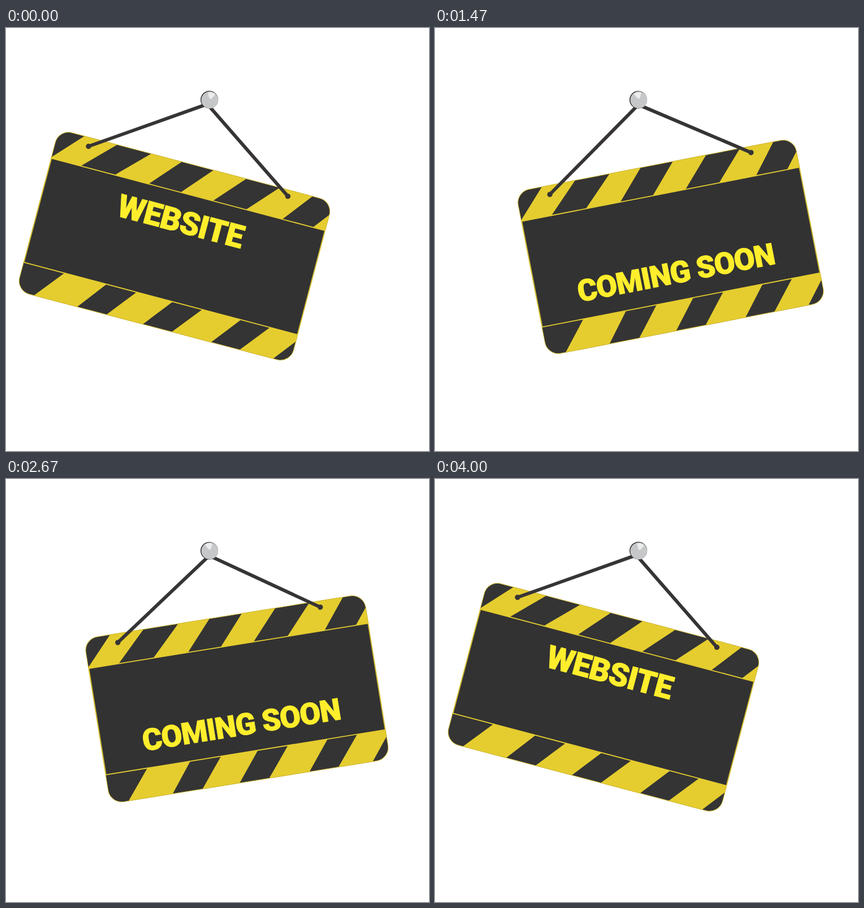
These frames come from a looping animation (748x748 px, 4060 ms). An HTML page:

```html
<!DOCTYPE html>
<html lang="en">
<head>
<meta charset="utf-8">
<title>Swinging sign</title>
<style>
  html, body { margin: 0; height: 100%; overflow: hidden; background: #fff; }
  svg { display: block; width: 100vw; height: 100vh; }
  text {
    font: 900 64px Roboto, "Open Sans", sans-serif;
    font-stretch: 84%;
    letter-spacing: -.02em;
    text-anchor: middle;
    fill: #ffee2c;
    stroke: #ffee2c;
    stroke-width: 1;
  }
</style>
</head>
<body>
<svg viewBox="0 0 748 748">
  <defs>
    <clipPath id="board"><rect x="-244.5" y="118.4" width="501.2" height="295.4" rx="24"/></clipPath>
    <clipPath id="clipA"><rect y="180" height="80"/></clipPath>
    <clipPath id="clipB"><rect y="272" height="80"/></clipPath>
  </defs>
  <g id="sign">
    <g clip-path="url(#board)">
      <rect x="-246" y="117" width="504" height="298" fill="#343434"/>
      <path id="stripes" fill="#e5cd2f"/>
      <rect x="-244" y="171.3" width="500.3" height="190.5" fill="#323232" stroke="#e5cd2f" stroke-width="1.8"/>
    </g>
    <rect x="-244.5" y="118.4" width="501.2" height="295.4" rx="24" fill="none" stroke="#d2ba30"/>
    <g clip-path="url(#clipA)"><text id="textA" x="5.3">WEBSITE</text></g>
    <g clip-path="url(#clipB)"><text id="textB" x="6.3">COMING SOON</text></g>
    <g fill="#373435">
      <path d="M-186 134.2 L-2 8.4 L177.4 129.5" fill="none" stroke="#373435" stroke-width="6"/>
      <circle cx="-186" cy="134.2" r="4.7"/>
      <circle cx="177.4" cy="129.5" r="4.7"/>
    </g>
    <circle cx="-.5" cy="-.2" r="15.6" fill="#373435"/>
    <circle cx=".3" cy=".2" r="14.9" fill="#c6c7c9"/>
    <path d="M-6 -12 Q0 -15.5 7 -12 L4.500 -6 Q2.500 -1 0 -2 Q-3 -4 -6 -12Z" fill="#ebecec"/>
  </g>
</svg>
<script>
const $ = id => document.getElementById(id);
const STEP = 100 / 3, LOOP = 4060;

// Each stripe: top left, top right, bottom right, bottom left
const band = (y1, y2, list) => list.map(([a, b, c, d]) =>
  `M${a} ${y1}L${b} ${y1}L${c} ${y2}L${d} ${y2}Z`).join('');

$('stripes').setAttribute('d',
  band(118, 171, [
    [-197, -137, -190, -246], [-75, -19, -66, -128], [39, 99, 51.5, -7.500],
    [160, 220, 178.500, 112], [276, 290, 290, 234.5]
  ]) +
  band(362, 414, [
    [-170, -93, -133, -212], [-38, 28, -13, -79.5],
    [82, 153, 112, 40], [206, 266, 225.5, 164]
  ]));

// Size the lettering by its own width, up to full height
function fit(id, width, middle) {
  const text = $(id);
  const size = Math.min(64, 64 * width / text.getComputedTextLength());
  text.style.fontSize = size + 'px';
  text.setAttribute('y', middle + size * .3555);
}
fit('textA', 228, 220.3);
fit('textB', 354, 312.3);

const clamp = (v, lo, hi) => Math.min(hi, Math.max(lo, v));

// Cubic bezier (.5, 0, .5, 1)
function ease(x) {
  let s = x;
  for (let i = 0; i < 6; i++)
    s -= (1.5 * s - 1.5 * s * s + s ** 3 - x) / (1.5 - 3 * s + 3 * s * s);
  return s * s * (3 - 2 * s);
}

const wipe = (t, start) => clamp((t - start) / 500, 0, 1);

function reveal(id, left, right, from, to) {
  const box = $(id).firstElementChild, width = right - left;
  box.setAttribute('x', left + width * from);
  box.setAttribute('width', width * Math.max(0, to - from));
}

function draw(now) {
  const n = Math.floor((now % LOOP + 4) / STEP), t = n * STEP;
  const u = (clamp(n, 1, 120) - 1) / 59.5;
  const angle = 14.9 - 29.8 * ease(u < 1 ? u : 2 - u) - .1;
  $('sign').setAttribute('transform', `translate(360 127) rotate(${angle})`);

  if (t < 2000) {
    reveal('clipA', -110, 121, wipe(t, 790), 1);
    reveal('clipB', -172, 185, 0, wipe(t, 820));
  } else {
    reveal('clipA', -110, 121, 0, wipe(t, 2800));
    reveal('clipB', -172, 185, wipe(t, 2765), 1);
  }
}

function loop() {
  draw(performance.now());
  requestAnimationFrame(loop);
}
loop();
</script>
</body>
</html>
```
